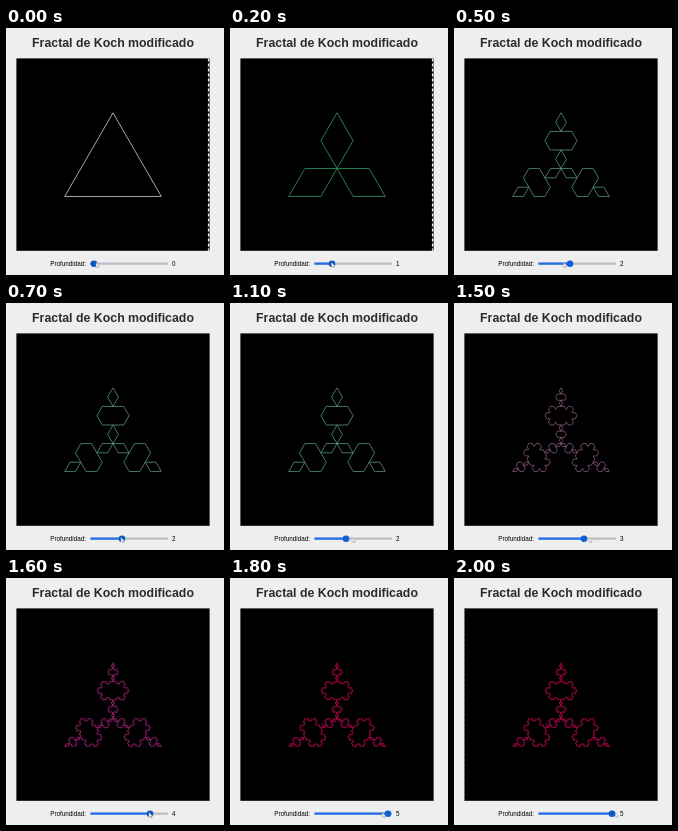
An HTML page with a canvas for the animation above (2.1 s loop, 218x247 px).

```html
<!DOCTYPE html>
<html lang="es">
<head>
<meta charset="utf-8">
<title>Fractal de Koch modificado</title>
<style>
html, body { margin: 0; width: 100%; height: 100%; overflow: hidden; background: #eee; }
canvas { display: block; width: 218px; height: 247px; }
</style>
</head>
<body>
<canvas id="stage"></canvas>
<script>
const W = 218, H = 247, LOOP = 2100, STEP = 100;
const canvas = document.getElementById('stage');
const ctx = canvas.getContext('2d');
const dpr = window.devicePixelRatio || 1;
canvas.width = W * dpr;
canvas.height = H * dpr;
ctx.scale(dpr, dpr);

const FONT = 'Arial, "Liberation Sans", sans-serif';
const BOX = { x: 10.4, y: 30.4, w: 193.2, h: 192.4 };
const COLORS = ['#d4d4d4', '#349c64', '#58947e', '#86587c', '#a42474', '#b0084c'];
const DEPTH_TIMES = [0, 200, 500, 1200, 1600, 1800];

// Pointer position along the slider: [ms, x]
const POINTER = [[0, 90], [100, 93], [200, 101.5], [700, 115], [1100, 122],
                 [1200, 125], [1500, 135], [1600, 143], [2000, 161.5]];

// Replaces an edge by four, with the spike pointing into the triangle
function koch(path, x1, y1, x2, y2, depth) {
  if (!depth) return path.lineTo(x2, y2);
  const dx = (x2 - x1) / 3, dy = (y2 - y1) / 3, s = Math.sqrt(3) / 2;
  const ax = x1 + dx, ay = y1 + dy, bx = x2 - dx, by = y2 - dy;
  const px = ax + dx / 2 - dy * s, py = ay + dy / 2 + dx * s;
  koch(path, x1, y1, ax, ay, depth - 1);
  koch(path, ax, ay, px, py, depth - 1);
  koch(path, px, py, bx, by, depth - 1);
  koch(path, bx, by, x2, y2, depth - 1);
}

function fractal(depth) {
  const side = 96.6, h = side * Math.sqrt(3) / 2, cx = 107, top = 84.8;
  const pts = [[cx, top], [cx + side / 2, top + h], [cx - side / 2, top + h]];
  const path = new Path2D();
  path.moveTo(...pts[0]);
  pts.forEach((p, i) => koch(path, ...p, ...pts[(i + 1) % 3], depth));
  path.closePath();
  return path;
}
const paths = COLORS.map((_, i) => fractal(i));

function pointerAt(t) {
  for (let i = 1; i < POINTER.length; i++) {
    const [t0, x0] = POINTER[i - 1], [t1, x1] = POINTER[i];
    if (t <= t1) return x0 + (x1 - x0) * (t - t0) / (t1 - t0);
  }
  return POINTER[POINTER.length - 1][1];
}

function text(str, x, y, size, color, weight = 'normal', align = 'left') {
  ctx.font = `${weight} ${size}px ${FONT}`;
  ctx.textAlign = align;
  ctx.fillStyle = color;
  ctx.fillText(str, x, y);
}

function bar(x, w, fill) {
  ctx.beginPath();
  ctx.roundRect(x, 234.6, w, 2.2, 1.1);
  ctx.fillStyle = fill;
  ctx.fill();
}

function dashes(x, color, width, dash) {
  ctx.save();
  ctx.setLineDash(dash);
  ctx.strokeStyle = color;
  ctx.lineWidth = width;
  ctx.beginPath();
  ctx.moveTo(x, BOX.y);
  ctx.lineTo(x, BOX.y + BOX.h);
  ctx.stroke();
  ctx.restore();
}

function slider(depth, px) {
  const x = 88 + depth * 14, over = Math.abs(px - x) < 3.6;
  bar(84.2, 77.8, '#bcbec4');
  bar(84.2, x - 84.2, '#2470ec');
  ctx.beginPath();
  ctx.arc(x, 235.7, 3.3, 0, Math.PI * 2);
  ctx.fillStyle = over ? '#0a58c4' : '#0c60d8';
  ctx.fill();
}

function pointer(x, y) {
  ctx.beginPath();
  ctx.moveTo(x, y);
  for (const [dx, dy] of [[0, 4.6], [1.2, 3.8], [2, 5.4], [2.8, 5], [2, 3.5], [3.4, 3.4]])
    ctx.lineTo(x + dx, y + dy);
  ctx.closePath();
  ctx.fillStyle = '#fafafa';
  ctx.fill();
  ctx.strokeStyle = '#999';
  ctx.lineWidth = 0.5;
  ctx.stroke();
}

function draw(now) {
  const t = Math.floor((now % LOOP) / STEP) * STEP;
  const depth = DEPTH_TIMES.filter(d => d <= t).length - 1;
  const px = pointerAt(t);

  ctx.fillStyle = '#eee';
  ctx.fillRect(0, 0, W, H);
  text('Fractal de Koch modificado', 107, 19, 12.35, '#2b2b2b', 'bold', 'center');

  ctx.fillStyle = '#000';
  ctx.fillRect(BOX.x, BOX.y, BOX.w, BOX.h);
  if (t < 400) dashes(202.6, '#eee', 1.4, [3, 2]);
  if (t >= 1900) dashes(10.5, '#777', 1, [3, 2]);

  ctx.strokeStyle = COLORS[depth];
  ctx.lineWidth = 0.8;
  ctx.stroke(paths[depth]);

  text('Profundidad:', 44.3, 238, 6.3, '#000');
  slider(depth, px);
  text(String(depth), 166, 238, 6.3, '#000');
  pointer(px, 234.6);
}

const start = performance.now();
function tick() {
  draw(performance.now() - start);
  requestAnimationFrame(tick);
}
tick();
</script>
</body>
</html>
```
